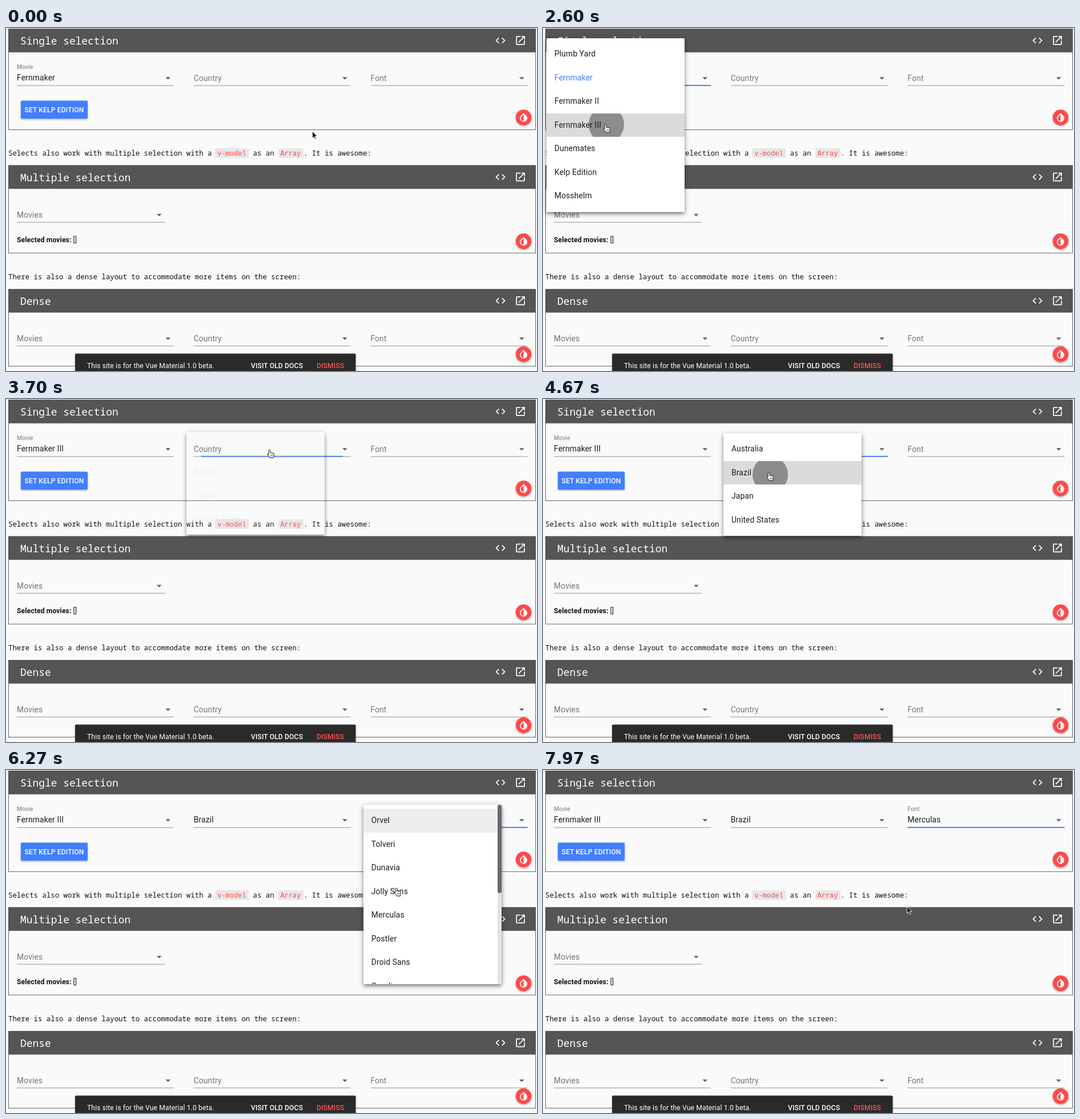
These frames come from a looping animation (930x602 px, 8 s). An HTML page:

```html
<!DOCTYPE html>
<html lang="en">
<head>
<meta charset="utf-8">
<title>Select demo</title>
<style>
  html, body { margin: 0; width: 100%; height: 100%; overflow: hidden; background: #fafafa; }
  body { position: relative; font: 13.84px Roboto, sans-serif; letter-spacing: .01em; }
  svg { position: absolute; left: 0; top: 0; width: 930px; height: 602px; }
  .mono { font: 12.38px "Noto Sans Mono", monospace; letter-spacing: 0; fill: #111; }
  .title { font: 300 17.9px "Noto Sans Mono", monospace; letter-spacing: 0; fill: #fff; }
  .code { font: 12px "Liberation Mono", monospace; letter-spacing: 0; fill: #ff4a4a; }
  .small { font-size: 12.11px; }
  .strong { font-size: 12.11px; font-weight: 500; }
  .menu { position: absolute; width: 242px; border-radius: 2px; }
  .shadow, .sheet { position: absolute; inset: 0; border-radius: 2px; }
  .shadow { box-shadow: 0 3px 5px -1px rgba(0,0,0,.3), 0 4px 8px rgba(0,0,0,.24), 0 1px 10px rgba(0,0,0,.16); }
  .sheet { background: #fff; overflow: hidden; padding-top: 7px; }
  .row { position: relative; height: 41.5px; line-height: 41.5px; padding-left: 14px; color: #1e1e1e; overflow: hidden; white-space: nowrap; }
  .row span { position: relative; }
  .ripple { position: absolute; border-radius: 50%; background: #000; }
  .track, .thumb { position: absolute; right: 0; top: 0; width: 7px; }
  .track { height: 100%; background: #e2e2e2; }
  .thumb { height: 155px; background: #696969; border-radius: 4px; }
</style>
</head>
<body>
<svg id="page" viewBox="0 0 930 602">
  <defs>
    <filter id="soft" x="-30%" y="-30%" width="160%" height="180%">
      <feDropShadow dx="0" dy="1.5" stdDeviation="1.6" flood-opacity=".32"/>
    </filter>
  </defs>
</svg>
<div id="menus"></div>
<svg viewBox="0 0 930 602">
  <g id="arrow">
    <path d="M0 0V12.2L2.8 9.7 4.7 14 6.7 13.1 4.8 8.9H8.6Z" fill="#111" stroke="#fff" stroke-width=".9"/>
  </g>
  <g id="hand">
    <g transform="scale(1.08) translate(-6.2 -7.4)" stroke="#333" stroke-width="1" stroke-linejoin="round">
      <path fill="#fff" d="M4 1.2c.9 0 1.3.6 1.3 1.3v3.6c.3-.6 1.8-.5 2 .3.5-.6 1.8-.4 2 .5.6-.5 1.9-.2 1.9 1v2.6c0 1.4-1 2-1 3.5H4.6C4.3 12.6 2.4 11.2 1 8.8.5 7.8 1.6 7 2.6 8V2.5C2.6 1.8 3 1.2 4 1.2z"/>
      <path d="M5.9 9v2.6M7.5 9v2.6M9.1 9v2.6" stroke-width=".7"/>
    </g>
  </g>
</svg>
<script>
const LOOP = 8000, BLUE = '#407fff', GRAY = '#757575', INK = '#1e1e1e', RED = '#ff4848';
const page = document.getElementById('page');

const clamp = v => Math.max(0, Math.min(1, v));
const ramp = (t, start, length) => clamp((t - start) / length);
const out = p => 1 - (1 - p) ** 3;
const smooth = p => p * p * (3 - 2 * p);
const mix = (a, b, p) => a + (b - a) * p;

function add(tag, attrs, text) {
  const el = document.createElementNS('http://www.w3.org/2000/svg', tag);
  for (const key in attrs) el.setAttribute(key, attrs[key]);
  if (text) el.textContent = text;
  return page.appendChild(el);
}
function div(parent, className, css, text) {
  const el = document.createElement('div');
  el.className = className;
  el.style.cssText = css || '';
  if (text) el.textContent = text;
  return parent.appendChild(el);
}
const rect = (x, y, width, height, fill, more) => add('rect', { x, y, width, height, fill, ...more });
const label = (x, y, text, fill, more) => add('text', { x, y, fill, ...more }, text);
const icon = (d, cx, cy, scale) =>
  add('path', { d, fill: '#fff', transform: `translate(${cx} ${cy}) scale(${scale}) translate(-12 -12)` });

const CODE = 'M9.4 16.6L4.8 12l4.6-4.6L8 6l-6 6 6 6 1.4-1.4zm5.2 0l4.6-4.6-4.6-4.6L16 6l6 6-6 6-1.4-1.4z';
const OPEN = 'M19 19H5V5h7V3H5c-1.11 0-2 .9-2 2v14c0 1.1.89 2 2 2h14c1.1 0 2-.9 2-2v-7h-2v7zM14 3v2h3.59l-9.83 9.83 1.41 1.41L19 6.41V10h2V3h-7z';
const DROP = 'M17.66 7.93L12 2.27 6.34 7.93c-3.12 3.12-3.12 8.19 0 11.31C7.9 20.8 9.95 21.58 12 21.58c2.05 0 4.1-.78 5.66-2.34 3.12-3.12 3.12-8.19 0-11.31zM12 19.59c-1.6 0-3.11-.62-4.24-1.76C6.62 16.69 6 15.19 6 13.59s.62-3.11 1.76-4.24L12 5.1v14.49z';

function panel(title, top, bottom) {
  rect(4.5, top + .5, 923, bottom - top, 'none', { stroke: '#666' });
  rect(4, top, 924, 41.5, '#555');
  label(25, top + 28, title, '#fff', { class: 'title' });
  icon(CODE, 866, top + 20.7, .865);
  icon(OPEN, 901, top + 20.7, .865);
}
function fab(cy) {
  add('circle', { cx: 906.5, cy, r: 13.8, fill: RED, filter: 'url(#soft)' });
  icon(DROP, 906.5, cy, .8);
}
function field(x, line, width, text) {
  rect(x, line - .5, width, 1, '#929292');
  add('path', { d: `M${x + width - 14.6} ${line - 14.8}h8.7l-4.35 4.4z`, fill: '#606060' });
  return label(x, line - 8.3, text, GRAY);
}

panel('Single selection', 1.2, 178);
panel('Multiple selection', 240.8, 394.5);
panel('Dense', 458, 593);

label(4, 223.5, 'Selects also work with multiple selection with a', '#111', { class: 'mono' });
rect(366.7, 211, 58.4, 17, '#e7e7e7');
label(370.2, 224, 'v-model', RED, { class: 'code' });
label(432.6, 223.5, 'as an', '#111', { class: 'mono' });
rect(477, 211, 44, 17, '#e7e7e7');
label(480.5, 224, 'Array', RED, { class: 'code' });
label(521, 223.5, '. It is awesome:', '#111', { class: 'mono' });
label(4, 440.7, 'There is also a dense layout to accommodate more items on the screen:', '#111', { class: 'mono' });

field(19, 341, 259.5, 'Movies');
label(19, 376, 'Selected movies:', '#111', { class: 'small', 'font-weight': 700 });
label(117.5, 376, '[]', '#111', { class: 'small' });
['Movies', 'Country', 'Font'].forEach((text, i) => field(19 + i * 309.7, 558, 275, text));

rect(26, 127.5, 117, 31.5, BLUE, { rx: 1.7, filter: 'url(#soft)' });
label(84.5, 147.7, 'SET KELP EDITION', '#fff', { class: 'strong', 'text-anchor': 'middle' });

// focus: underline grows, open: menu appears, click: an item is chosen, blur: focus is lost
const selects = [
  { x: 19, text: '', value: 'Fernmaker', floated: 'Movie', focus: 1106, open: 1270, click: 2600, blur: 3430,
    menu: [6, 18.3, 304.5], selected: 1, pick: 3, hover: [[1270, 1], [2010, 2], [2090, 3]], press: [105, 20],
    items: ['Plumb Yard', 'Fernmaker', 'Fernmaker II', 'Fernmaker III', 'Dunemates', 'Kelp Edition', 'Mosshelm'] },
  { x: 328.7, text: 'Country', focus: 3539, open: 3670, click: 4670, blur: 5820,
    menu: [316, 60, 180], pick: 1, hover: [[3670, 0], [4330, 1]], press: [82, 24],
    items: ['Australia', 'Brazil', 'Japan', 'United States'] },
  { x: 638.5, text: 'Font', floated: 'Font', focus: 5840, open: 5950, click: 6970, blur: 9000,
    menu: [625.8, 61, 315.3], pick: 4, hover: [[5950, 0], [6300, 3], [6680, 4]], press: [60, 8], scroll: true,
    items: ['Orvel', 'Tolveri', 'Dunavia', 'Jolly Sans', 'Merculas', 'Postler', 'Droid Sans', 'Quorlia'] }
];

const menuLayer = document.getElementById('menus');
for (const s of selects) {
  s.placeholder = field(s.x, 101, 275, s.text);
  s.valueText = label(s.x, 92.2, '', INK);
  s.tag = label(s.x, 72.3, s.floated || '', GRAY);
  s.bar = rect(s.x, 99.8, 275, 1.8, BLUE);

  const [x, y, height] = s.menu;
  s.box = div(menuLayer, 'menu', `left:${x}px;top:${y}px;height:${height}px`);
  s.shadow = div(s.box, 'shadow');
  s.sheet = div(s.box, 'sheet');
  s.rows = s.items.map((text, i) => {
    const row = div(s.sheet, 'row', i === s.selected ? `color:${BLUE}` : '');
    if (i === s.pick) s.ripple = div(row, 'ripple');
    const caption = document.createElement('span');
    caption.textContent = text;
    row.appendChild(caption);
    return row;
  });
  if (s.scroll) {
    div(s.sheet, 'track');
    div(s.sheet, 'thumb');
  }
}

[157, 374.3, 572.5].forEach(fab);
rect(121, 571.5, 491.5, 40, '#2b2b2b', { rx: 1.7, filter: 'url(#soft)' });
label(142, 596.5, 'This site is for the Vue Material 1.0 beta.', '#fff', { class: 'small' });
label(429, 596.5, 'VISIT OLD DOCS', '#fff', { class: 'strong' });
label(544, 596.5, 'DISMISS', '#ff5252', { class: 'strong' });

function hoverAlpha(s, row, t) {
  let alpha = 0;
  s.hover.forEach(([start, index], i) => {
    if (index !== row) return;
    const next = s.hover[i + 1];
    alpha = .07 * ramp(t, start, 90) * (next ? 1 - ramp(t, next[0], 90) : 1);
  });
  return row === s.pick && t >= s.click - 30 ? .14 : alpha;
}

function drawSelect(s, t) {
  const chosen = t >= s.click + 60;
  const grow = out(ramp(t, s.focus, 300));
  s.bar.setAttribute('x', s.x + 137.5 * (1 - grow));
  s.bar.setAttribute('width', 275 * grow);
  s.bar.setAttribute('opacity', 1 - ramp(t, s.blur, 120));

  s.valueText.textContent = chosen ? s.items[s.pick] : s.value || '';
  s.placeholder.setAttribute('opacity', chosen ? 0 : 1);
  if (s.floated) {
    const up = s.value ? 1 : out(ramp(t, s.click + 60, 300));
    s.tag.setAttribute('opacity', s.value || chosen ? 1 : 0);
    s.tag.setAttribute('y', mix(92.7, 72.3, up));
    s.tag.setAttribute('font-size', mix(13.84, 10.38, up));
    s.tag.setAttribute('fill', s.value && t > s.focus && !chosen ? BLUE : GRAY);
  }

  const close = 1 - ramp(t, s.click + 120, 260);
  const shown = t >= s.open - 80 && close > 0;
  s.box.style.display = shown ? '' : 'none';
  if (!shown) return;
  s.box.style.transform = `translateY(${-6 * (1 - out(ramp(t, s.open - 60, 300)))}px)`;
  s.shadow.style.opacity = ramp(t, s.open - 80, 120) * close;
  s.sheet.style.opacity = smooth(ramp(t, s.open, 230)) * close;
  s.rows.forEach((row, i) => row.style.background = `rgba(0,0,0,${hoverAlpha(s, i, t)})`);

  const spread = ramp(t, s.click - 30, 400), radius = spread > 0 ? mix(16, 215, spread) : 0;
  const [px, py] = s.press;
  Object.assign(s.ripple.style, {
    left: px - radius + 'px', top: py - radius + 'px',
    width: 2 * radius + 'px', height: 2 * radius + 'px',
    opacity: .36 * (1 - ramp(t, s.click + 40, 320))
  });
}

// each move: start, end, x and y reached
const start = [541, 188];
const moves = [
  [30, 610, 245, 92], [1930, 2200, 112, 176], [2780, 3390, 464, 96], [4270, 4500, 398, 136],
  [4820, 5320, 706, 91], [5960, 6250, 686, 214], [6600, 6770, 685.5, 240], [7890, 7960, 642, 246]
];
const handTimes = [[440, 2960], [3130, 4980], [5130, 7900]];
const arrow = document.getElementById('arrow'), hand = document.getElementById('hand');

function drawCursor(t) {
  let [x, y] = start;
  for (const [from, to, nx, ny] of moves) {
    const p = smooth(ramp(t, from, to - from));
    x = mix(x, nx, p);
    y = mix(y, ny, p);
  }
  const isHand = handTimes.some(([a, b]) => t >= a && t < b);
  hand.setAttribute('display', isHand ? 'inline' : 'none');
  arrow.setAttribute('display', isHand ? 'none' : 'inline');
  hand.setAttribute('transform', `translate(${x} ${y})`);
  arrow.setAttribute('transform', `translate(${x - 4.5} ${y - 6.8})`);
}

const began = performance.now();
function frame() {
  const t = (performance.now() - began) % LOOP;
  selects.forEach(s => drawSelect(s, t));
  drawCursor(t);
  requestAnimationFrame(frame);
}
frame();
</script>
</body>
</html>
```
